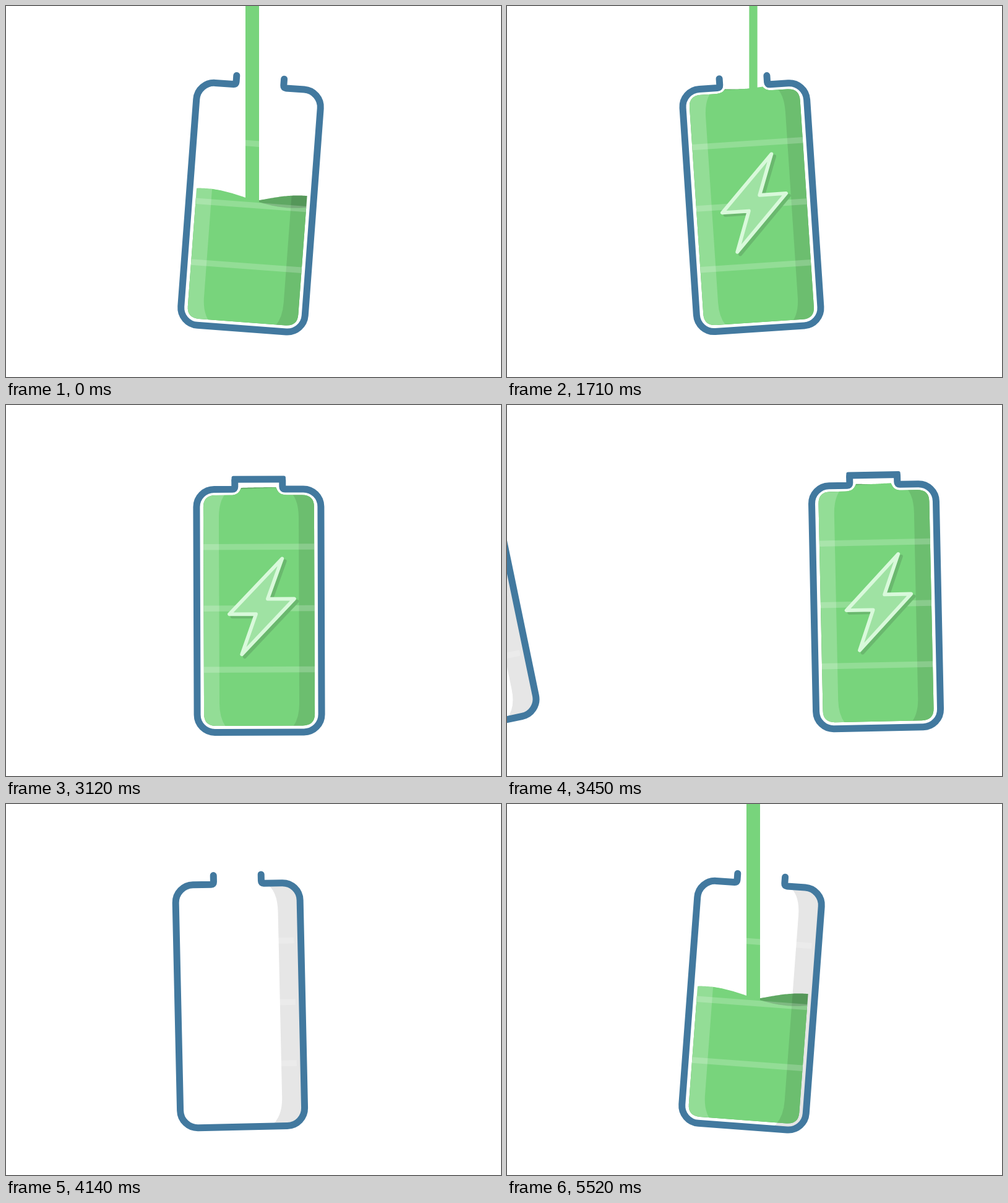
Recreate the animation shown at these times as an HTML page with a canvas. Size 800 px wide and 600 px high, loop 5.55 s.

```html
<!DOCTYPE html>
<html lang="en">
<head>
<meta charset="utf-8">
<title>Battery filling</title>
<style>
html, body { margin: 0; width: 800px; height: 600px; overflow: hidden; background: #fff; }
canvas { display: block; }
</style>
</head>
<body>
<canvas id="stage" width="800" height="600"></canvas>
<script>
const ctx = document.getElementById('stage').getContext('2d');
const LOOP = 5550, CYCLE = 5520, STEP = 30;
const CX = 395.5, CY = 325.7, STREAM_X = 398;
const BLUE = '#42799f', GREEN = '#78d47c', DARK = '#5fa863';

const outline = new Path2D(
  'M-38.5-211V-200.5Q-38.5-196.5-42.5-196.5H-72A28.5 28.5 0 0 0-100.5-168V168' +
  'A28.5 28.5 0 0 0-72 196.5H72A28.5 28.5 0 0 0 100.5 168V-168' +
  'A28.5 28.5 0 0 0 72-196.5H42.5Q38.5-196.5 38.5-200.5V-211');
const shell = new Path2D();
shell.roundRect(-100.5, -196.5, 201, 393, 28.5);
const tank = new Path2D(
  'M-89.5 167V-168Q-89.5-187-70-187H-46C-36-187-31-190-28-200H28' +
  'C31-190 36-187 46-187H70Q89.5-187 89.5-168V167' +
  'Q89.5 186 70 186H-70Q-89.5 186-89.5 167Z');
const rightSide = new Path2D('M46-200V-196Q64.5-185 64.5-150V150Q64.5 182 46 196H102V-200Z');
const leftSide = new Path2D('M-46-200V-196Q-64.5-185-64.5-150V150Q-64.5 182-46 196H-102V-200Z');
const bolt = new Path2D('M57-19L14-19 37.5-84-48 5.5-5 5.5-28 70.5Z');
const BOLT_LENGTH = 472;

const clamp = v => Math.min(1, Math.max(0, v));
const part = (t, a, b) => clamp((t - a) / (b - a));
const smooth = u => (1 - Math.cos(Math.PI * u)) / 2;
const linear = u => u;

function track(t, keys, ease = linear) {
  if (t <= keys[0][0]) return keys[0][1];
  for (let i = 1; i < keys.length; i++) {
    const [a, from] = keys[i - 1], [b, to] = keys[i];
    if (t <= b) return from + (to - from) * ease((t - a) / (b - a));
  }
  return keys[keys.length - 1][1];
}

// Time of one battery's life: it enters near 3420, is full near 7900 and leaves by 9200.
const level = t => track(t, [[4480, 192], [4680, 141.5], [5100, 60], [5520, -14.5],
  [6000, -77], [6540, -136], [7000, -180], [7250, -198]]);
const waveHeight = t => track(t, [[4480, 3], [4620, 10.8], [6900, 10.8], [7400, 1.5]]);
const frontCrest = t => track(t, [[4400, 10], [4680, 55], [5520, 191], [6540, 466], [8000, 860]]);
const backCrest = t => 55 - 0.277 * (t - 4680);
const streamWidth = t => track(t, [[4680, 32], [5520, 22], [6540, 14.5], [7920, 12]]);

function pose(t) {
  const ahead = 1 - part(t, 3420, 4478);
  const leave = Math.max(0, (t - 8414) / 226);
  const swing = t < 5420
    ? 4.35 * Math.sin(Math.PI / 2 * part(t, 4530, 5420))
    : track(t, [[5420, 4.35], [6970, -4.15], [8370, 0]], smooth);
  return {
    x: CX - 525 * ahead ** 3 + 13.5 * leave ** 3 +
      track(t, [[7920, 0], [8130, -14], [8370, 0]], smooth),
    y: CY + track(t, [[8540, 0], [8630, 7], [8790, 0]], smooth),
    angle: swing - 12.4 * ahead ** 2 - 0.2 * leave ** 2
  };
}

function enter(p) {
  ctx.save();
  ctx.translate(p.x, p.y);
  ctx.rotate(p.angle * Math.PI / 180);
}

function fill(path, color) {
  ctx.fillStyle = color;
  ctx.fill(path);
}

function liquid(t, crest) {
  const path = new Path2D('M-91 200');
  for (let x = -91; x <= 91; x += 2) {
    path.lineTo(x, level(t) - waveHeight(t) * Math.cos(2 * Math.PI * (x - crest) / 264));
  }
  path.lineTo(91, 200);
  path.closePath();
  return path;
}

function drawStream(t) {
  if (t < 4240 || t > 8100) return;
  const w = streamWidth(t), x = STREAM_X - w / 2;
  const tip = -20 + 530 * part(t, 4240, 4500);
  const top = track(t, [[7730, -30], [7800, 30], [7920, 74], [8060, 150]]);
  const end = Math.min(tip, CY + Math.min(level(t) + 12, 178));
  ctx.fillStyle = GREEN;
  if (end > top) {
    const head = t < 4500 ? w / 2 : 0;
    ctx.beginPath();
    ctx.roundRect(x, top, w, end - top, [w / 2, w / 2, head, head]);
    ctx.fill();
  }
  if (t >= 7800) {
    const y = track(t, [[7800, 39], [7920, 56], [8060, 142]]);
    ctx.beginPath();
    ctx.arc(STREAM_X - 1, y, 8.8, 0, 7);
    ctx.fill();
  }
}

function drawBolt(t) {
  const shown = part(t, 6240, 6940);
  if (!shown) return;
  const half = 235.5 * Math.max(0, (t - 6220) / 387);
  ctx.save();
  ctx.globalAlpha = shown;
  ctx.lineWidth = 5.8;
  if (half < 245) {
    ctx.setLineDash([2 * half, 2 * BOLT_LENGTH]);
    ctx.lineDashOffset = half - 227.5;
  }
  const layer = (dx, dy, inside, edge) => {
    ctx.save();
    ctx.translate(dx, dy);
    fill(bolt, inside);
    ctx.strokeStyle = edge;
    ctx.stroke(bolt);
    ctx.restore();
  };
  layer(4.5, 4, '#6ab86e', '#6ab86e');
  layer(0, 0, '#9fe2a3', '#d9f9db');
  ctx.restore();
}

function drawLid(t) {
  const grow = smooth(part(t, 8160, 8280));
  if (!grow) return;
  const drop = part(t, 8390, 8560) ** 2;
  ctx.beginPath();
  ctx.roundRect(-43.7 * grow, -218 - 78 * (1 - drop), 87.4 * grow, 11, 3);
  ctx.fillStyle = BLUE;
  ctx.fill();
}

function drawBattery(t, shaded) {
  const p = pose(t);
  const wet = t > 4480;
  const front = liquid(t, frontCrest(t)), back = liquid(t, backCrest(t));

  enter(p);
  if (shaded) {
    ctx.save();
    ctx.clip(shell);
    fill(rightSide, '#e6e6e6');
    ctx.restore();
  }
  if (wet) {
    ctx.clip(tank);
    fill(back, DARK);
  }
  ctx.restore();

  drawStream(t);

  enter(p);
  if (wet) {
    ctx.save();
    ctx.clip(tank);
    fill(front, GREEN);
    const both = new Path2D(front);
    both.addPath(back);
    ctx.clip(both);
    fill(leftSide, 'rgba(255,255,255,.2)');
    fill(rightSide, 'rgba(0,0,0,.1)');
    ctx.restore();
  }
  ctx.fillStyle = 'rgba(255,255,255,.2)';
  for (const y of [-108, -8.5, 90.5]) ctx.fillRect(-89.5, y, 179, 9.5);
  drawBolt(t);
  ctx.strokeStyle = BLUE;
  ctx.lineWidth = 11;
  ctx.stroke(outline);
  drawLid(t);
  ctx.restore();
}

function frame(now) {
  const t = Math.floor(now % LOOP / STEP) * STEP;
  ctx.fillStyle = '#fff';
  ctx.fillRect(0, 0, 800, 600);
  if (t < 3720) drawBattery(t + CYCLE, false);
  if (t >= 3420) drawBattery(t, true);
  requestAnimationFrame(frame);
}

ctx.lineCap = ctx.lineJoin = 'round';
requestAnimationFrame(frame);
</script>
</body>
</html>
```
